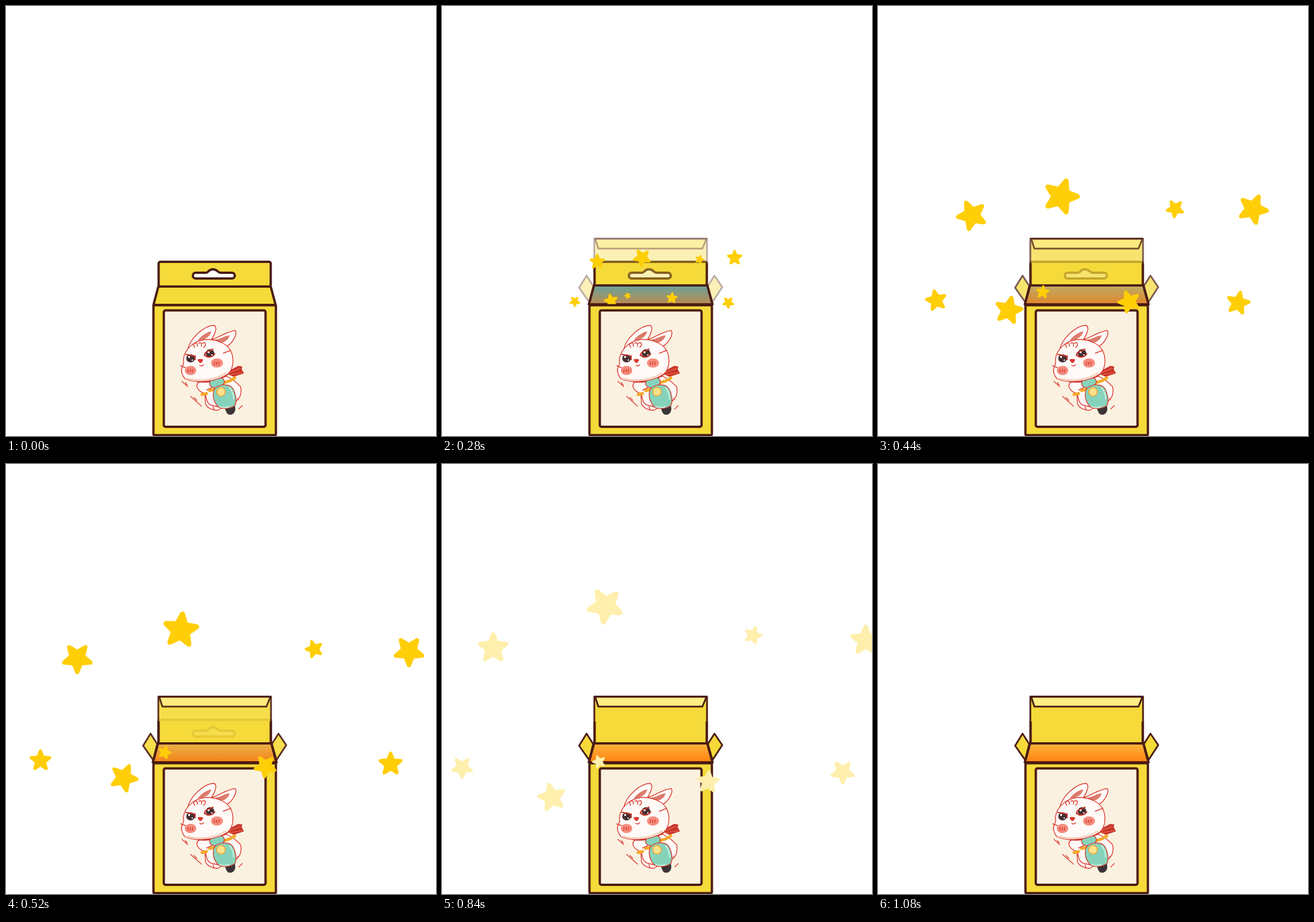
An HTML page for the animation above (1120 ms loop, 748 by 748 pixels).

```html
<!DOCTYPE html>
<html lang="en">
<head>
<meta charset="utf-8">
<title>Box of stars</title>
<style>
  html, body { margin: 0; width: 100%; height: 100%; overflow: hidden; background: #fff; }
  svg { display: block; width: 100vw; height: 100vh; }
  .line { stroke: #4a1c14; stroke-width: 4; stroke-linejoin: round; }
  .thin { stroke: #4a1c14; stroke-width: 3; stroke-linejoin: round; }
  .yellow { fill: #f5da3a; }
  .red { stroke: #d93a30; stroke-width: 1.4; stroke-linecap: round; stroke-linejoin: round; }
  .white { fill: #fffaf7; }
  .none { fill: none; }
  #open > * { opacity: var(--show); }
  #stars path { stroke-width: .27; stroke-linejoin: round; }
</style>
</head>
<body>
<svg viewBox="0 0 748 748">
  <defs>
    <linearGradient id="cool" x2="0" y2="1">
      <stop stop-color="#0c9ad5"/><stop offset="1" stop-color="#998f72"/>
    </linearGradient>
    <linearGradient id="warm" x2="0" y2="1">
      <stop stop-color="#ffb43c"/><stop offset="1" stop-color="#ff8210"/>
    </linearGradient>
  </defs>

  <g id="closed">
    <rect class="yellow line" x="265.5" y="445" width="195" height="43" rx="3"/>
    <path class="line" fill="#fff" d="M330 464H348C352 464 352 458 360 458S368 464 373 464H393A5 5 0 0 1 393 474H330A5 5 0 0 1 330 464Z"/>
    <path id="neck" class="yellow line" d="M265 488H460.500L469 520H256.500Z"/>
  </g>

  <path id="hollow" class="line" fill="url(#cool)" d="M264.500 486H461.500L470.500 519H255.500Z"/>
  <g id="open">
    <rect class="yellow thin" x="265" y="404.500" width="196" height="81.500"/>
    <path class="line none" d="M265.500 448V486M460.500 448V486"/>
    <path class="thin" fill="#ffee86" d="M266.500 405H460L453 422H272Z"/>
    <path class="yellow thin" d="M251.500 469L263 487L256 515L238.500 490Z"/>
    <path class="yellow thin" d="M474 469L487.500 489L470.500 515L462.500 487Z"/>
    <path class="line" fill="url(#warm)" d="M264.500 486H461.500L470.500 519H255.500Z"/>
  </g>

  <g id="stars"></g>

  <g id="front">
    <rect class="yellow line" x="256.500" y="520.500" width="213" height="226" rx="2"/>
    <rect class="line" fill="#fbf1e1" x="274.500" y="529.500" width="177" height="202.500" rx="3"/>

    <!-- speed lines -->
    <path class="red none" d="M306 653L316 662M312 655L315 659M321 679L340 696M327 681L332 686M405 701L411 695"/>

    <!-- rider's body -->
    <path class="red white" d="M334 655C328 664 338 672 346 674L347 692C350 700 362 704 369 703L374 700L402 686C409 680 410 669 408 662L397 652L384 644Z"/>
    <path class="red none" d="M346 674C350 684 348 690 356 694L372 698M362 703L360 697M402 686L404 682M349 668L358 664"/>

    <!-- scarf -->
    <path fill="#c8352b" d="M320 649C342 656 367 651 385 636L404 626L411 627L410 632L414 639L405 642L396 645L387 641C370 654 338 661 320 649Z"/>
    <path class="none" stroke="#f0744d" stroke-width="1.2" d="M386 639L408 630M390 641L411 638"/>

    <!-- scooter -->
    <path fill="#3b3436" d="M381 700L398 695C401 705 396 711 390 711S383 706 381 700Z"/>
    <path class="none" stroke="#f5aa28" stroke-width="5" stroke-linecap="round" d="M341 676L349 674M354 669L363 667M380 655L390 652L398 647"/>
    <ellipse class="red" fill="#86d3bb" cx="367" cy="655" rx="13" ry="9" transform="rotate(-14 367 655)"/>
    <path class="red" fill="#86d3bb" d="M362 668C366 658 388 655 395 666C400 675 402 688 398 695C390 701 374 702 368 696C362 689 358 678 362 668Z"/>
    <path class="none" stroke="#c9f0df" stroke-width="2" stroke-linecap="round" d="M389 664C394 670 396 678 396 684M372 697C378 699 384 699 388 697"/>
    <circle cx="374" cy="671" r="7.500" fill="#fbe28a" stroke="#f0a330" stroke-width="1.500"/>

    <!-- ears and head -->
    <path class="red white" d="M316 598C320 578 344 556 362 555.500C369 559 363 572 355 584Z"/>
    <path fill="#dc7a6c" d="M333 582C340 573 350 567 357 566C356 572 350 578 343 580Z"/>
    <path class="red white" d="M358 580C371 577 383 566 399 564.500C403 571 393 590 380 594Z"/>
    <path fill="#dc7a6c" d="M364 580C373 580 381 573 389 573C387 581 378 587 371 586Z"/>
    <path class="red white" d="M309 622C306 602 323 583 347 580C371 579 387 591 391 600C397 612 396 632 386 640C364 656 326 656 311 648C306 642 304 634 306 629Z"/>
    <path class="none" stroke="#f7d3c2" stroke-width="3" d="M315 648C338 654 367 650 383 638"/>
    <path class="red none" d="M304 626L312 629M378 604L391 599"/>
    <path class="red none" d="M326 588L328 594M327 587Q333 584 333 592M335 587Q341 583 340 592M341 587Q347 583 347 590L344 594"/>

    <!-- face -->
    <ellipse fill="#f58d7e" cx="321" cy="634" rx="10" ry="8"/>
    <ellipse fill="#f58d7e" cx="367" cy="621" rx="10.500" ry="8"/>
    <path class="red none" d="M317 632L316 637M321 632L320 637M325 632L324 637M363 619L362 624M367 619L366 624M371 619L370 624"/>
    <ellipse fill="#453133" cx="321" cy="613" rx="7.500" ry="7"/>
    <ellipse fill="#453133" cx="355" cy="604" rx="7.500" ry="7"/>
    <path class="none" stroke="#c8352b" stroke-width="2.200" stroke-linecap="round" d="M313 606L329 609L329 615M345 608L347 603L360 597M347 608C349 612 359 612 363 605"/>
    <path fill="#fff" d="M317 609h3v3h-3ZM351 601h3v3h-3ZM323 615h2v2h-2ZM357 606h2v2h-2Z"/>
    <path fill="#d93a30" d="M333 615Q338 613 343 615Q341 621 338 621Q335 620 333 615Z"/>
    <path class="red none" d="M337 625Q340 628 344 624"/>
  </g>
</svg>

<script>
const LOOP = 1120, STEP = 40;
const $ = id => document.getElementById(id);

// Step numbers at which the star paths are pinned; all begin at ORIGIN.
const KNOTS = [0.5, 4, 6, 10, 13, 16, 19];
const ORIGIN = [366, 525];

// r: radius, a: angle at step 10, dir: spin, then x and y at the inner knots
const STARS = [
  { r: 32.5, a: 6,   dir: -1, x: [348, 334, 304, 290, 284], y: [438, 381, 289, 259, 247] },
  { r: 27.5, a: 36,  dir: -1, x: [270, 211, 124, 101, 89],  y: [445, 398, 338, 326, 320] },
  { r: 16.5, a: -18, dir: 1,  x: [448, 490, 536, 539, 541], y: [441, 391, 322, 305, 298] },
  { r: 27.5, a: 36,  dir: 1,  x: [509, 591, 701, 726, 737], y: [438, 389, 326, 314, 307] },
  { r: 19.5, a: 0,   dir: 1,  x: [231, 155, 60, 43, 35],    y: [514, 510, 516, 524, 528] },
  { r: 25.5, a: 24,  dir: 1,  x: [294, 256, 205, 195, 191], y: [513, 515, 546, 570, 580] },
  { r: 12,   a: 18,  dir: 1,  x: [323, 301, 276, 275, 273], y: [504, 496, 502, 513, 518] },
  { r: 20.5, a: 40,  dir: -1, x: [400, 420, 451, 460, 463], y: [508, 506, 526, 546, 553] },
  { r: 21.5, a: 0,   dir: -1, x: [498, 572, 669, 688, 697], y: [516, 513, 522, 531, 536] }
];

function starPath() {
  let d = '';
  for (let i = 0; i < 10; i++) {
    const r = i % 2 ? 0.39 : 0.87, a = i * Math.PI / 5;
    d += (i ? 'L' : 'M') + (r * Math.sin(a)).toFixed(3) + ' ' + (-r * Math.cos(a)).toFixed(3);
  }
  return d + 'Z';
}

// The last knot lets each path drift a little further.
function track(start, v) {
  return [start, ...v, v[4] + 0.55 * (v[4] - v[3])];
}

// Smooth curve through the pinned values
function curve(v, n) {
  const last = KNOTS.length - 1;
  let i = 0;
  while (i < last - 1 && n > KNOTS[i + 1]) i++;
  const slope = k => {
    const a = Math.max(0, k - 1), b = Math.min(last, k + 1);
    return (v[b] - v[a]) / (KNOTS[b] - KNOTS[a]);
  };
  const h = KNOTS[i + 1] - KNOTS[i], u = (n - KNOTS[i]) / h, w = 1 - u;
  return w * w * (1 + 2 * u) * v[i] + u * u * (3 - 2 * u) * v[i + 1]
    + h * u * w * (w * slope(i) - u * slope(i + 1));
}

const shape = starPath();
for (const s of STARS) {
  s.px = track(ORIGIN[0], s.x);
  s.py = track(ORIGIN[1], s.y);
  s.el = document.createElementNS('http://www.w3.org/2000/svg', 'path');
  s.el.setAttribute('d', shape);
  $('stars').append(s.el);
}

// Burst from 160 ms, a short hold, then the fade from 720 ms
function stepAt(t) {
  if (t < 160) return 0;
  if (t < 720) return Math.min(12, 1 + Math.floor((t - 160) / STEP));
  return Math.min(19, 13 + Math.floor((t - 720) / STEP));
}

// Stars pale towards white but stay opaque.
function starColour(strength) {
  const mix = c => Math.round(255 + (c - 255) * strength);
  return `rgb(255, ${mix(206)}, ${mix(6)})`;
}

let shown = -1;
function draw(n) {
  if (n === shown) return;
  shown = n;
  const opened = n > 0;
  $('closed').style.display = n < 11 ? '' : 'none';
  $('neck').style.display = opened ? 'none' : '';
  $('hollow').style.display = opened ? '' : 'none';
  $('open').style.setProperty('--show', Math.min(1, n / 11));

  // The burst leaves the box from behind its front.
  if (n < 5) $('stars').after($('front'));
  else $('front').after($('stars'));

  const strength = n < 13 ? 1 : Math.max(0, 0.76 - (n - 13) * 0.143);
  const colour = starColour(strength);
  $('stars').style.display = opened && strength > 0 ? '' : 'none';
  $('stars').style.fill = $('stars').style.stroke = colour;
  const at = Math.max(n, 1), size = Math.min(1, at / 8);
  for (const s of STARS) {
    const turn = s.a + s.dir * 6 * (n - 10);
    s.el.setAttribute('transform',
      `translate(${curve(s.px, at)} ${curve(s.py, at)}) rotate(${turn}) scale(${s.r * size})`);
  }
}

function tick() {
  draw(stepAt(performance.now() % LOOP));
  requestAnimationFrame(tick);
}
tick();
</script>
</body>
</html>
```
